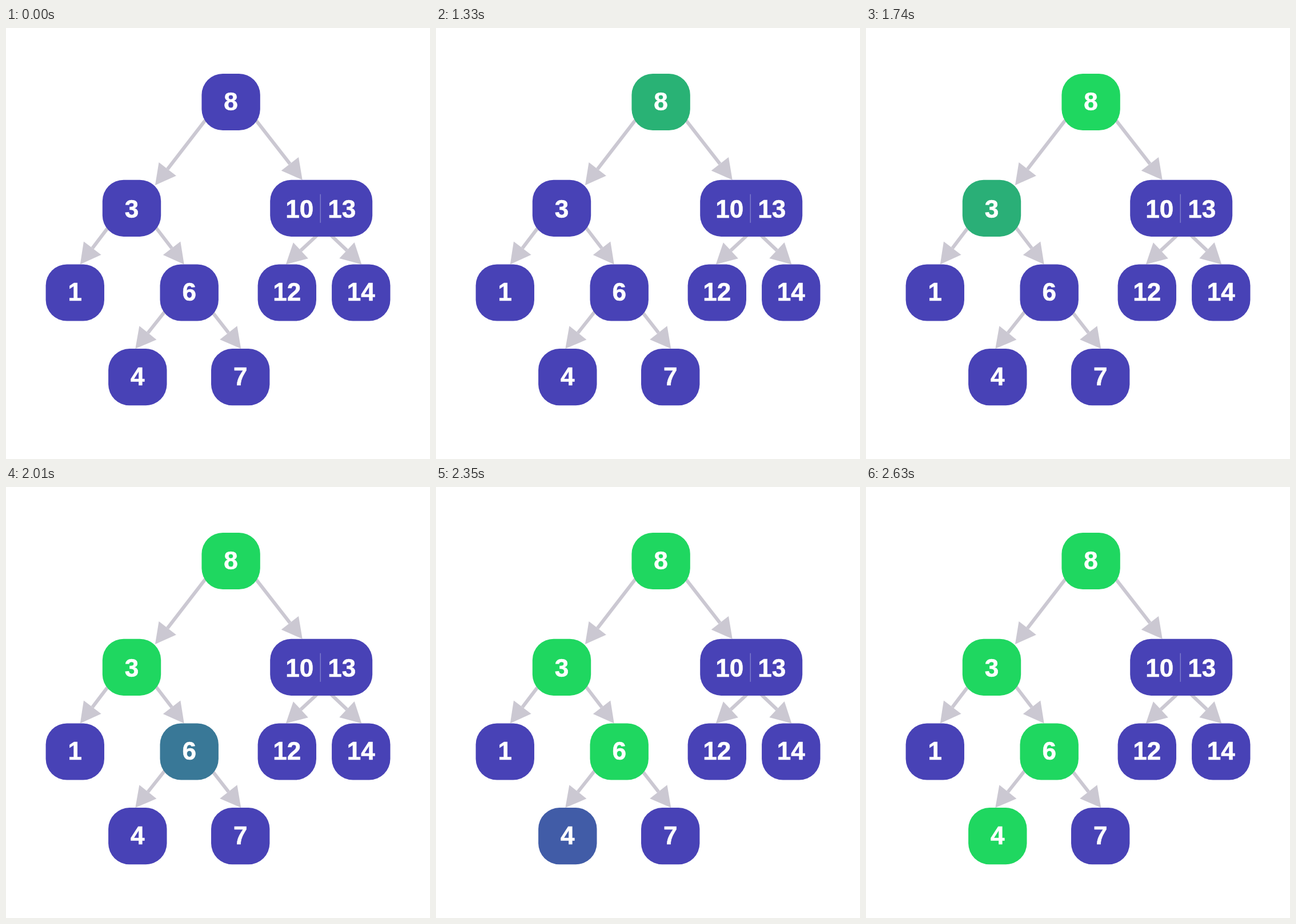
An HTML page that plays this animation: 742x754 px, repeating every 5690 ms.

```html
<!DOCTYPE html>
<html lang="en">
<head>
<meta charset="utf-8">
<title>Tree search</title>
<style>
  html, body { margin: 0; width: 100%; height: 100%; overflow: hidden; background: #fff; }
  svg { display: block; width: 742px; height: 754px; }
  rect { fill: #4842b6; }
  .edge { stroke: #cbc8d2; stroke-width: 6; }
  .head { fill: #cbc8d2; }
  .divider { stroke: #8582cf; stroke-width: 1.3; }
  text {
    font: bold 44px "Liberation Sans", Arial, sans-serif;
    fill: #fff; stroke: #fff; stroke-width: .6; text-anchor: middle;
  }
</style>
</head>
<body>
<svg id="tree" viewBox="0 0 742 754"></svg>
<script>
const LOOP = 5690, FADE = 318;
const BASE = '#4842b6', FOUND = '#1fd760';
const CURVE = 'cubic-bezier(.35,.2,.6,.95)';
const WIDTH = 102.4, HEIGHT = 99.2, RADIUS = 37;
const HEAD = 35.5, HALF = 19.2;
const tree = document.getElementById('tree');

const rows = [
  { y: 129.5, base: 144 },
  { y: 315.3, base: 332 },
  { y: 463, base: 477 },
  { y: 610.7, base: 624.5 }
];

const nodes = {
  8: { x: 393.6, row: 0, found: 1130 },
  3: { x: 220, row: 1, found: 1545 },
  10: { x: 551.7, row: 1, width: 179, keys: ['10', '13'] },
  1: { x: 120.8, row: 2 },
  6: { x: 320.7, row: 2, found: 1902 },
  12: { x: 491.8, row: 2 },
  14: { x: 621.3, row: 2 },
  4: { x: 230.3, row: 3, found: 2288 },
  7: { x: 410.2, row: 3 }
};

// parent, child, then x offsets from each one's centre
const edges = [
  [8, 3, -48, 41], [8, 10, 47, -33],
  [3, 1, -43, 9], [3, 6, 44, -9],
  [10, 12, 5, -2], [10, 14, 5, 1],
  [6, 4, -45, -4], [6, 7, 42, 1]
];

function add(name, attrs, text) {
  const item = document.createElementNS('http://www.w3.org/2000/svg', name);
  for (const key in attrs) item.setAttribute(key, attrs[key]);
  if (text) item.textContent = text;
  return tree.appendChild(item);
}

// How far a box's rounded top lies below its highest point
function drop(width, dx) {
  const past = Math.max(0, Math.abs(dx) - width / 2 + RADIUS);
  return RADIUS - Math.sqrt(RADIUS ** 2 - past ** 2);
}

function drawEdge([parent, child, from, to]) {
  const a = nodes[parent], b = nodes[child];
  const x1 = a.x + from, y1 = rows[a.row].y + 36;
  const x2 = b.x + to;
  const y2 = rows[b.row].y - HEIGHT / 2 + drop(b.width || WIDTH, to) * .8;
  const length = Math.hypot(x2 - x1, y2 - y1);
  const ux = (x2 - x1) / length, uy = (y2 - y1) / length;
  const bx = x2 - ux * HEAD, by = y2 - uy * HEAD;
  // Start a little inside the parent, which covers the end
  add('line', { class: 'edge', x1: x1 - ux * 8, y1: y1 - uy * 8, x2: bx, y2: by });
  add('polygon', {
    class: 'head',
    points: [x2, y2, bx - uy * HALF, by + ux * HALF, bx + uy * HALF, by - ux * HALF].join(' ')
  });
}

function drawNode(name) {
  const { x, row, found, width = WIDTH, keys = [name] } = nodes[name];
  const { y, base } = rows[row];
  const box = add('rect', { x: x - width / 2, y: y - HEIGHT / 2, width, height: HEIGHT, rx: RADIUS });
  if (found) {
    box.animate([
      { fill: BASE, offset: 0 },
      { fill: BASE, offset: found / LOOP, easing: CURVE },
      { fill: FOUND, offset: (found + FADE) / LOOP },
      { fill: FOUND, offset: 1 }
    ], { duration: LOOP, iterations: Infinity });
  }
  const mid = (keys.length - 1) / 2;
  keys.forEach((key, i) => add('text', { x: x - mid * 2 + (i - mid) * 74, y: base }, key));
  if (mid) add('line', { class: 'divider', x1: x - 1.5, y1: y - 24.5, x2: x - 1.5, y2: y + 25.5 });
}

edges.forEach(drawEdge);
Object.keys(nodes).forEach(drawNode);
</script>
</body>
</html>
```
